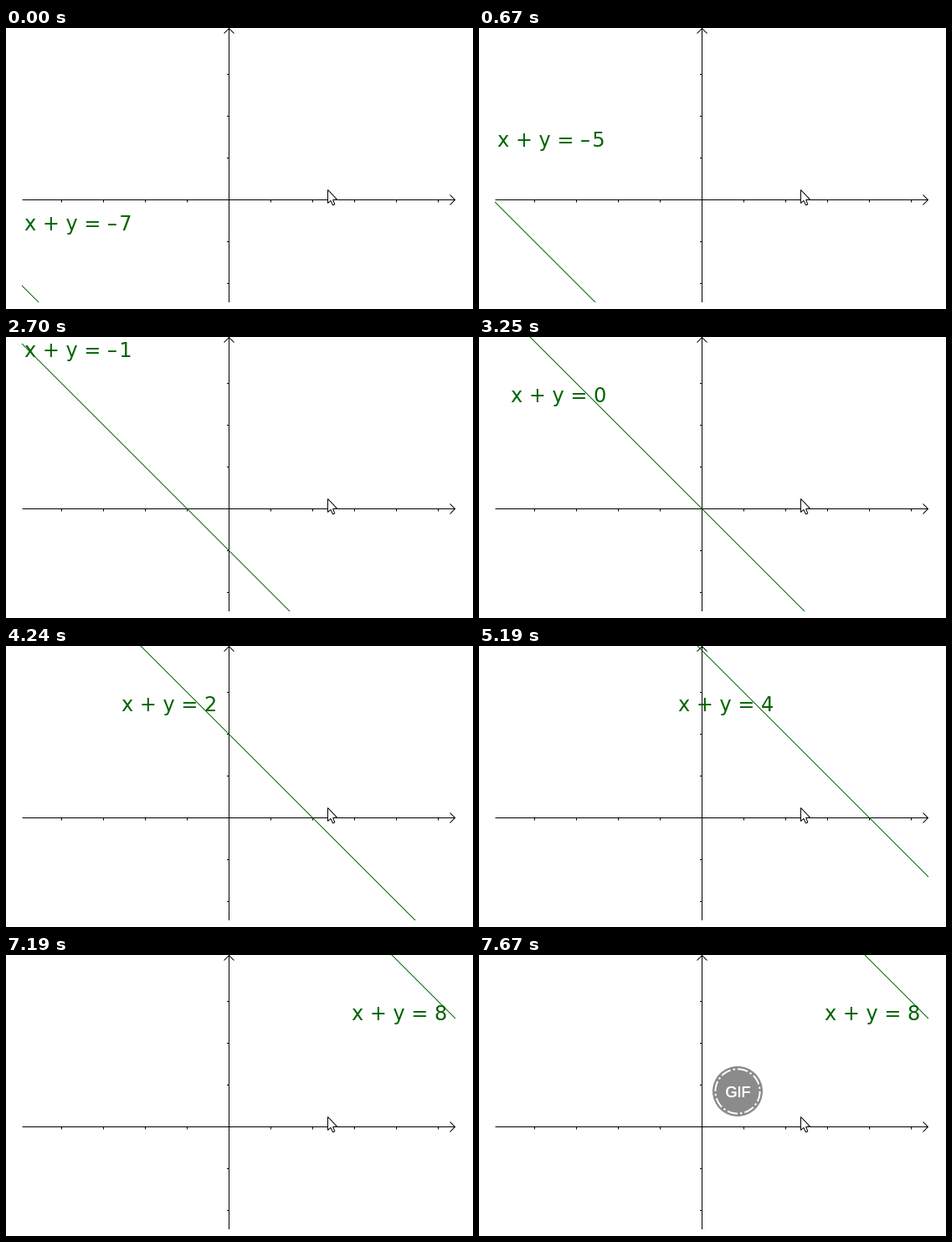
Animation, 558 px wide and 336 px high, one loop 7960 ms. Source, as a matplotlib script:

```python
import matplotlib.pyplot as plt
from matplotlib import patheffects
from matplotlib.animation import FuncAnimation
from matplotlib.patches import Circle, Polygon, Rectangle

W, H, DPI = 558, 336, 100
LOOP, STEP = 7960, 20
PX = 72 / DPI                    # one pixel in points
OX, OY, UNIT = 266, 205, 50      # axis origin and unit length in pixels
LEFT, RIGHT, BOTTOM = 19, 537, 328
GREEN = "#006400"

# Times at which the constant goes up by one, from -7 to 8
STEPS = [210, 670, 1220, 1680, 2230, 2700, 3250, 3710,
         4240, 4720, 5190, 5740, 6200, 6730, 7190]
BADGE_TIME = 7670

fig = plt.figure(figsize=(W / DPI, H / DPI), dpi=DPI, facecolor="white")
ax = fig.add_axes([0, 0, 1, 1])
ax.set_xlim(0, W)
ax.set_ylim(H, 0)
ax.axis("off")


def stroke(points, color="black", z=1):
    """Draw a one-pixel line through pixel centres."""
    xs, ys = zip(*points)
    return ax.plot([x + 0.5 for x in xs], [y + 0.5 for y in ys], color=color,
                   lw=PX, zorder=z, solid_capstyle="butt", snap=False)[0]


def draw_axes():
    stroke([(LEFT, OY), (RIGHT - 0.5, OY)])
    stroke([(OX, 0), (OX, BOTTOM - 0.5)])
    stroke([(530, OY - 6), (536, OY), (530, OY + 6)])
    stroke([(OX - 6, 6), (OX, 0), (OX + 6, 6)])
    for k in range(-4, 6):
        if k:
            x = OX + k * UNIT
            stroke([(x, OY), (x, OY + 3)])
    for k in range(-2, 4):
        if k:
            y = OY - k * UNIT
            stroke([(OX - 2.5, y), (OX, y)])


def draw_cursor(x, y):
    shape = [(0, 0), (0, 16), (3.4, 12.9), (6, 18.3), (8.3, 17.4),
             (6.2, 12), (11, 11.5)]
    ax.add_patch(Polygon([(x + dx + 0.5, y + dy + 0.5) for dx, dy in shape],
                         fc="white", ec="black", lw=PX, zorder=5))


def make_badge(x, y):
    gray = "#8b8b8b"
    disc = Circle((x, y), 30, fc=gray, ec="none", zorder=6)
    ring = Circle((x, y), 26.6, fc="none", ec="white", lw=2 * PX, zorder=7,
                  linestyle=(0, (6.2, 1.5, 1.25, 1.5)), capstyle="butt")
    ax.add_patch(disc)
    ax.add_patch(ring)
    word = ax.text(x + 0.5, y + 6.8, "GIF", color="white", ha="center",
                   va="baseline", family="Liberation Sans",
                   fontsize=18 * PX, zorder=8)
    word.set_path_effects([patheffects.withStroke(linewidth=0.5 * PX,
                                                  foreground="white")])
    return disc, ring, word


def label_pos(c):
    """Left edge and baseline of the label, kept inside the view."""
    if c >= 0:
        return (38 if c < 5 else 13) + UNIT * c, 78
    edge = OY + LEFT - OX - UNIT * c
    return 22, max(24, edge - (66 if c <= -5 else 42))


draw_axes()
draw_cursor(384, 193)
line = stroke([(0, 0), (1, 1)], GREEN, z=3)
view = Rectangle((LEFT, 0), RIGHT - LEFT, BOTTOM, transform=ax.transData)
line.set_clip_path(view)
label = ax.text(0, 0, "", color=GREEN, family="DejaVu Sans",
                fontsize=24 * PX, va="baseline", ha="left", zorder=4)
badge = make_badge(309, 163)


def update(i):
    t = i * STEP + STEP / 2
    c = -7 + sum(t >= s for s in STEPS)
    shift = OY - OX - UNIT * c
    line.set_data([0.5, W + 0.5], [shift + 0.5, W + shift + 0.5])
    label.set_position(label_pos(c))
    sign = "\u2013\u200a" if c < 0 else ""  # dash and hair space
    label.set_text(f"x + y = {sign}{abs(c)}")
    for part in badge:
        part.set_visible(t >= BADGE_TIME)
    return (line, label, *badge)


anim = FuncAnimation(fig, update, frames=LOOP // STEP, interval=STEP,
                     repeat=True, repeat_delay=0, blit=False)
plt.show()
```
